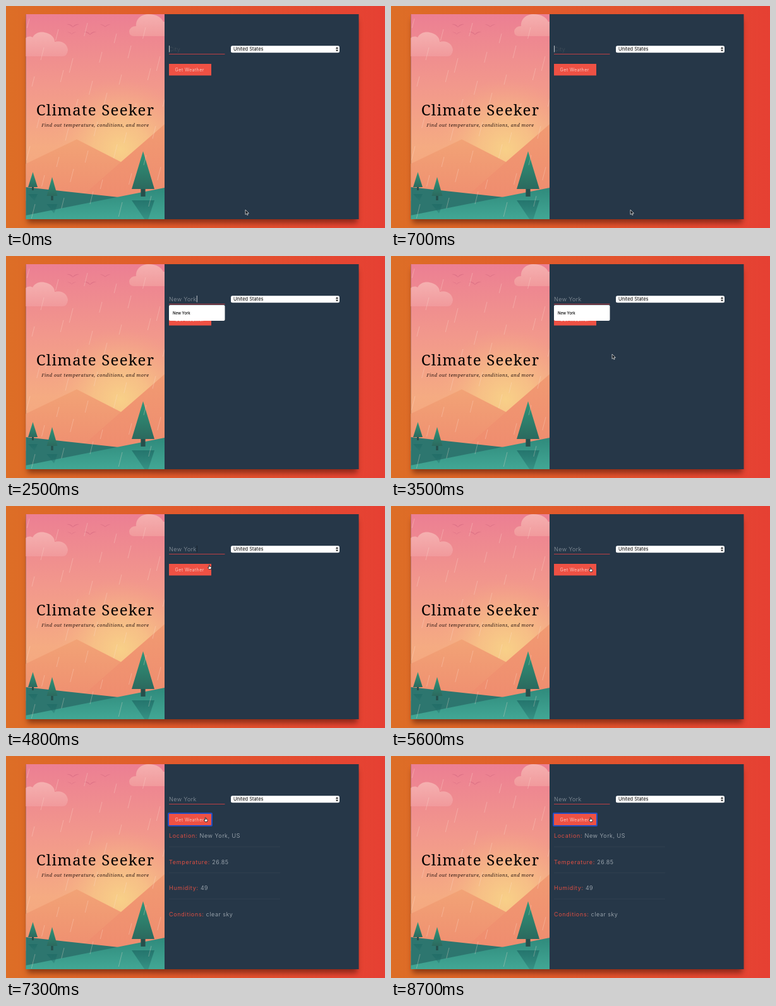
An HTML page that plays this animation: 600x353 px, repeating every 8.8 s.

```html
<!DOCTYPE html>
<html lang="en">
<head>
<meta charset="utf-8">
<title>Climate Seeker</title>
<style>
  html, body { margin: 0; width: 100%; height: 100%; overflow: hidden; }
  body { background: linear-gradient(to right, #dd6e26, #e64033); }
  svg { display: block; width: 600px; height: 353px; }
  text { white-space: pre; font-family: Inter, "Open Sans", sans-serif; }
  .shadow { filter: blur(4px); opacity: .5; }
  .title { font: 500 24px "Noto Serif", serif; letter-spacing: 1.25px; text-anchor: middle; }
  .tagline { font: italic 7.4px "Noto Serif", serif; letter-spacing: .5px; text-anchor: middle; fill: #2b1713; }
  .city { font-size: 9px; font-weight: 300; letter-spacing: .4px; }
  .button { font-size: 7.2px; font-weight: 300; letter-spacing: .42px; fill: #fbe3df; }
  .result { font-size: 9px; letter-spacing: .68px; fill: #dc4e42; }
  .result .value { font-weight: 300; letter-spacing: .55px; fill: #b3bbc2; }
</style>
</head>
<body>
<svg viewBox="0 0 600 353" xmlns="http://www.w3.org/2000/svg">
  <defs>
    <linearGradient id="sky" x2="0" y2="1">
      <stop offset="0" stop-color="#ec7f93"/>
      <stop offset=".35" stop-color="#f2988c"/>
      <stop offset=".65" stop-color="#f5ab82"/>
      <stop offset="1" stop-color="#f3a078"/>
    </linearGradient>
    <radialGradient id="glow" gradientUnits="userSpaceOnUse" cx="182" cy="228" r="112">
      <stop offset="0" stop-color="#f8d088"/>
      <stop offset=".4" stop-color="#f7c487" stop-opacity=".8"/>
      <stop offset="1" stop-color="#f5a886" stop-opacity="0"/>
    </radialGradient>
    <linearGradient id="cloud" x2="0" y2="1">
      <stop offset="0" stop-color="#f5b0b0"/>
      <stop offset="1" stop-color="#f19a9c"/>
    </linearGradient>
    <linearGradient id="farPeak" x2="0" y2="1">
      <stop offset="0" stop-color="#f2a376"/>
      <stop offset="1" stop-color="#ef8e70"/>
    </linearGradient>
    <linearGradient id="nearPeak" x2="0" y2="1">
      <stop offset="0" stop-color="#f19a72"/>
      <stop offset="1" stop-color="#ef8c6f"/>
    </linearGradient>
    <linearGradient id="meadow" x2="0" y2="1">
      <stop offset="0" stop-color="#2f8a7c"/>
      <stop offset="1" stop-color="#42a795"/>
    </linearGradient>
    <linearGradient id="leaf" x2="0" y2="1">
      <stop offset="0" stop-color="#2f967a"/>
      <stop offset="1" stop-color="#2c695e"/>
    </linearGradient>
    <linearGradient id="shade" x2="0" y2="1">
      <stop offset="0" stop-color="#1f6b66" stop-opacity=".75"/>
      <stop offset="1" stop-color="#1f6b66" stop-opacity=".25"/>
    </linearGradient>
    <clipPath id="scene"><path d="M31.5 13H251V339H31.5Z"/></clipPath>
    <path id="bird" d="M-10 -2Q-4 -3 0 2Q4 -3 10 -2Q4 -1 0 3Q-4 -1 -10 -2Z"/>
  </defs>

  <rect class="shadow" x="34" y="22" width="522" height="323" fill="#3c0a00"/>
  <rect x="31.5" y="13" width="527" height="326" fill="#263748"/>

  <g clip-path="url(#scene)">
    <path d="M31 13H251V339H31Z" fill="url(#sky)"/>
    <path d="M31 13H251V339H31Z" fill="url(#glow)"/>
    <g fill="url(#cloud)">
      <path d="M31 51C35 48 39 48 42 50C47 41 57 40 65 43C73 46 77 51 77 57C88 54 97 60 98 70Q97 80 89 80H31Z"/>
      <path d="M195 40Q197 32 206 32C205 20 215 13 226 13C238 13 246 18 249 25L251 25V48H203Q195 48 195 40Z"/>
    </g>
    <g fill="#d86d83" opacity=".75">
      <use href="#bird" x="106" y="31"/>
      <use href="#bird" transform="translate(133 43)"/>
      <use href="#bird" transform="translate(157 31) scale(.85)"/>
      <use href="#bird" transform="translate(104 43) scale(.7)"/>
    </g>
    <path d="M31 251L112 212L182 248L251 285V310H31Z" fill="url(#farPeak)"/>
    <path d="M116 306L182 248L251 188V310Z" fill="url(#nearPeak)"/>
    <path d="M31 288L178 304L110 339H31Z" fill="#2d766f"/>
    <path d="M31 333L178 303.5L251 289V339H31Z" fill="url(#meadow)"/>
    <g id="trees"></g>
    <g id="rain" stroke="#ffe3d6" stroke-width=".8" opacity=".4"></g>
    <text class="title" x="141.5" y="173.5">Climate Seeker</text>
    <text class="tagline" x="141.3" y="192">Find out temperature, conditions, and more</text>
  </g>

  <text id="city" class="city" x="258" y="71.5"></text>
  <path id="caret" d="M0 63V73.5" stroke-width=".8"/>
  <path d="M258 76.5H346.5" stroke="#bd3f43"/>

  <rect x="356" y="63.2" width="172" height="11" rx="2.5" fill="#fff"/>
  <text x="360" y="71.4" font-size="7.5">United States</text>
  <path d="M522 68L524 65L526 68ZM522 69.5L524 72.5L526 69.5Z" fill="#222"/>

  <rect x="258" y="92" width="67" height="18.5" fill="#ee5144"/>
  <rect id="focus" x="257" y="91" width="69" height="20" rx="1" fill="none" stroke="#1f4fc4" stroke-width="2"/>
  <text class="button" x="267.6" y="103.8">Get Weather</text>

  <g id="suggestion">
    <rect x="258" y="78" width="88.5" height="25" rx="2" fill="#fff"/>
    <text x="264" y="93" font-size="6" font-weight="500">New York</text>
  </g>

  <g id="results"></g>

  <path id="arrow" d="M0 0V7.6L1.7 6L2.9 8.6L4.2 8L3.1 5.5H5.4Z" fill="#15191e" stroke="#f4f4f4" stroke-width=".7"/>
  <g id="hand">
    <path transform="scale(.85)" d="M-1 -3.4Q0 -4.4 .7 -3.2V-.9L3 -.4Q4 0 3.6 1.6L3 4.2H-.9L-3 1Q-3 -.2 -1 .8Z" fill="#fff" stroke="#161a20"/>
  </g>
</svg>

<script>
const $ = id => document.getElementById(id);
const LOOP = 8800, STEP = 100;

const TYPING = [[900, 'N'], [1100, 'Ne'], [1300, 'New'], [1500, 'New '],
  [1700, 'New Y'], [1800, 'New Yo'], [2000, 'New Yor'], [2100, 'New York']];
const TYPED = 2100, PICK = 4300, CLICK = 5700, LOADED = 7000;
// time, x, y of the pointer tip
const POINTER = [[0, 379, 324], [2700, 379, 324], [3200, 364, 215], [3500, 350, 156],
  [4000, 306, 95], [4400, 306, 93], [4800, 322, 97], [5400, 316, 101], [LOOP, 316, 101]];

const tree = (x, top, base, half, trunk) => `
  <path d="M${x - half} ${base + trunk + 6}H${x + half}L${x + half * .35} ${base + trunk + (base - top) * .7}Z" fill="url(#shade)"/>
  <rect x="${x - half * .2}" y="${base}" width="${half * .4}" height="${trunk}" fill="#26504c"/>
  <path d="M${x} ${top}L${x + half} ${base}H${x - half}Z" fill="url(#leaf)"/>`;
$('trees').innerHTML = tree(42.5, 264, 288, 7.5, 5) + tree(73, 272, 302, 8.5, 7) + tree(217, 231, 291, 18, 12);

let drops = '';
for (let row = 0; row < 8; row++) {
  for (let col = 0; col < 5; col++) {
    const x = 47 + col * 46 + (row * 23) % 38 - 10;
    const y = 20 + row * 39 + (col * 17 + row * 7) % 27;
    const length = 15 + (row * 5 + col * 3) % 9;
    drops += `<path d="M${x} ${y}l${-length * .25} ${length}"/>`;
  }
}
$('rain').innerHTML = drops;

$('results').innerHTML = [['Location', 'New York, US'], ['Temperature', '26.85'],
  ['Humidity', '49'], ['Conditions', 'clear sky']].map(([label, value], i) => {
  const y = 130.3 + i * 41.5;
  const rule = i < 3 ? `<path d="M258 ${y + 14}H434" stroke="#334352" stroke-width=".8"/>` : '';
  return `<text class="result" x="258" y="${y}">${label}: <tspan class="value">${value}</tspan></text>${rule}`;
}).join('');

const show = (id, on) => $(id).setAttribute('visibility', on ? 'visible' : 'hidden');

function pointerAt(t) {
  const i = POINTER.findIndex(p => p[0] > t);
  const [t0, x0, y0] = POINTER[i - 1], [t1, x1, y1] = POINTER[i];
  const k = (t - t0) / (t1 - t0);
  return [x0 + (x1 - x0) * k, y0 + (y1 - y0) * k];
}

function draw(t) {
  const typed = TYPING.filter(([at]) => at <= t).map(([, text]) => text).pop() || '';
  const city = $('city');
  city.textContent = typed || 'City';
  city.setAttribute('fill', typed ? '#8f99a2' : '#434f5a');

  const blinkOn = t < TYPED || Math.floor((t - TYPED) / 450) % 2 === 0;
  const caretX = 258.6 + (typed ? city.getComputedTextLength() : 0);
  $('caret').setAttribute('transform', `translate(${caretX} 0)`);
  $('caret').setAttribute('stroke', t < PICK ? '#e8ebee' : '#151d26');
  show('caret', blinkOn && t < CLICK);

  show('suggestion', typed && t < PICK);
  show('focus', t >= CLICK);
  show('results', t >= LOADED);

  const [x, y] = pointerAt(t);
  const overButton = t >= PICK;
  const visible = t < 900 || t >= 2700;
  for (const id of ['arrow', 'hand']) $(id).setAttribute('transform', `translate(${x} ${y})`);
  show('arrow', visible && !overButton);
  show('hand', overButton);
}

function tick() {
  draw(Math.floor(performance.now() % LOOP / STEP) * STEP);
  requestAnimationFrame(tick);
}
tick();
</script>
</body>
</html>
```
